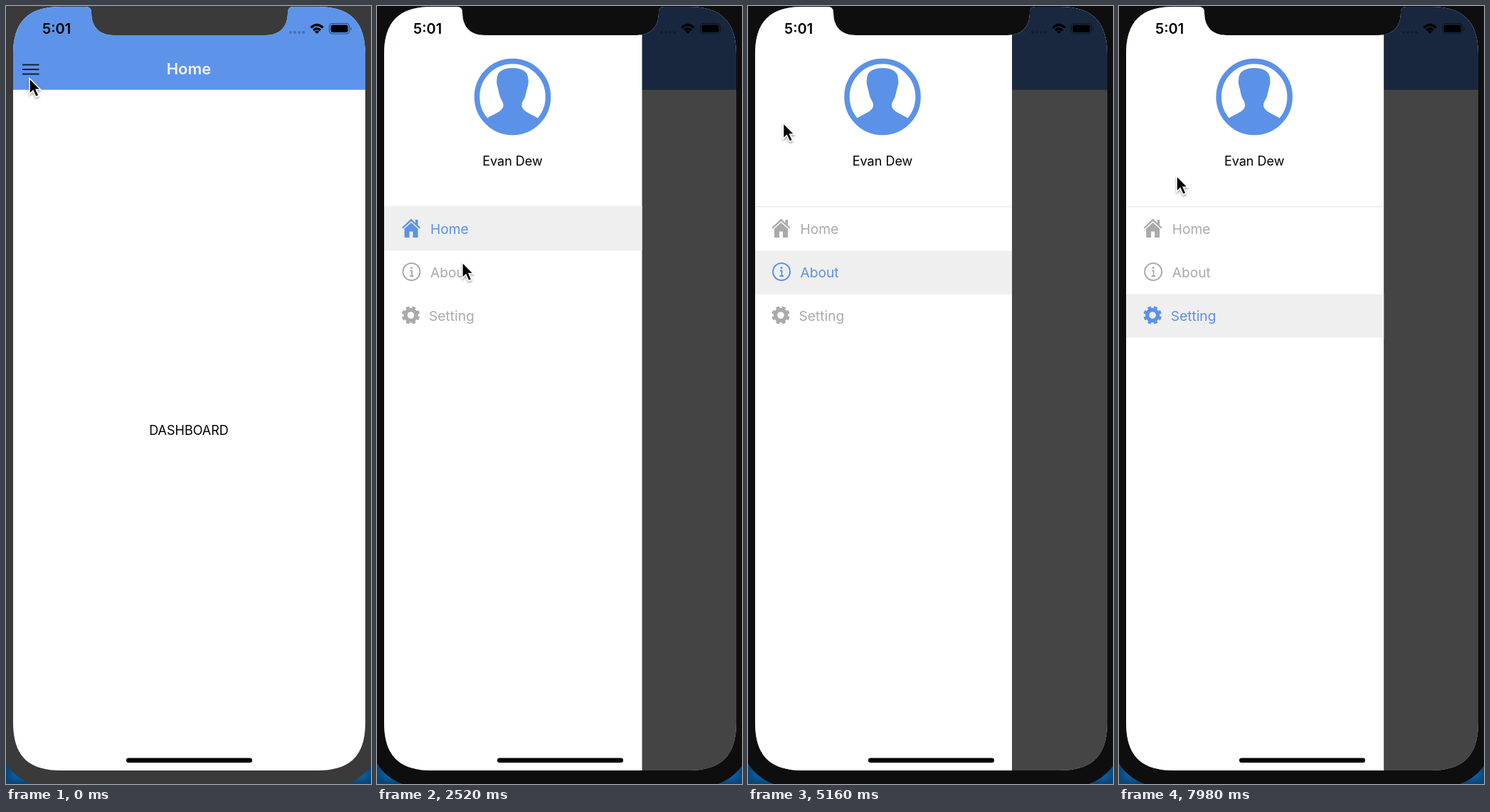
Recreate the animation shown at these times as an HTML page. Size 513 px wide and 1092 px high, loop 8 s.

```html
<!DOCTYPE html>
<html lang="en">
<head>
<meta charset="utf-8">
<title>Drawer menu</title>
<style>
  html, body { margin: 0; width: 100%; height: 100%; overflow: hidden; }
  svg { display: block; width: 513px; height: 1092px; font-family: Inter, Roboto, sans-serif; }
  .mid { text-anchor: middle; }
  .item { font-size: 19.2px; fill: #aaa; color: #aaa; }
  .item.on { fill: #5b92e8; color: #5b92e8; }
  .item .row { fill: none; }
  .item.on .row { fill: #efefef; }
  .line { fill: none; stroke: currentColor; }
</style>
</head>
<body>
<svg viewBox="0 0 513 1092">
  <defs>
    <clipPath id="screen">
      <path d="M10 68C10 22 31 1 77 1H112Q120 1 120 9C120 29 131 41 151 41H365C385 41 396 29 396 9Q396 1 404 1H438C484 1 505 22 505 68V1006C505 1052 484 1073 438 1073H77C31 1073 10 1052 10 1006Z"/>
    </clipPath>
    <clipPath id="disc"><circle cx="190.5" cy="127.5" r="50"/></clipPath>
    <radialGradient id="desk">
      <stop offset=".3" stop-color="#0a5fa3"/>
      <stop offset="1" stop-color="#0a4577"/>
    </radialGradient>
    <filter id="shadow" x="-50%" y="-50%" width="200%" height="200%">
      <feDropShadow dx="0" dy="2" stdDeviation="1.5" flood-opacity=".4"/>
    </filter>
  </defs>

  <rect id="bezel" width="513" height="1092"/>
  <path fill="url(#desk)" d="M0 1063Q12 1083 36 1092H0Z"/>
  <path fill="url(#desk)" d="M515 1063Q503 1083 479 1092H515Z"/>

  <g clip-path="url(#screen)">
    <rect width="513" height="1092" fill="#fff"/>
    <rect width="513" height="117.5" fill="#5d94ea"/>
    <path d="M10 117.5H505" stroke="#a9b9d2"/>
    <path d="M23 82.5H46.500M23 89H46.500M23 95.500H46.500" stroke="#14213a" stroke-width="2"/>
    <text id="title" class="mid" x="257" y="96" font-size="22" font-weight="600" fill="#f3f3f3"></text>
    <text id="body" class="mid" x="257" y="601.500" font-size="18"></text>
    <rect id="dim" width="513" height="1092"/>

    <g id="drawer">
      <rect x="10" width="362.500" height="1092" fill="#fff"/>
      <g fill="#5b92e8">
        <circle cx="190.500" cy="127.500" r="50" fill="none" stroke="#5b92e8" stroke-width="7.500"/>
        <path clip-path="url(#disc)" d="M190.500 87C177 87 168.500 92 168.500 103Q167.500 108 169.500 114C171 119 171 121 172 124C173 131 178 134 177.500 140C177 148 163 152 154 158V182H227V158C218 152 204 148 203.500 140C203 134 208 131 209 124C210 121 210 119 211.500 114Q213.500 108 212.500 103C212.500 92 204 87 190.500 87Z"/>
      </g>
      <text class="mid" x="190.500" y="223.500" font-size="18">Evan Dew</text>
      <path d="M10 281.500H372.500" stroke="#ececec" stroke-width="1.500"/>

      <g class="item">
        <rect class="row" x="10" y="281" width="362.500" height="62.500"/>
        <path d="M48 298.500L35 311L36.500 312.500L48 302L59.500 312.500L61 311L57.500 307.500V300H54V304.500ZM48 304L38.500 312.500V325H45.500V316.500H50.500V325H57.500V312.500Z"/>
        <text x="75" y="319.500">Home</text>
      </g>
      <g class="item">
        <rect class="row" x="10" y="343.500" width="362.500" height="61"/>
        <circle class="line" cx="48.500" cy="373" r="12" stroke-width="2"/>
        <circle cx="48.500" cy="367.500" r="1.500"/>
        <path class="line" d="M46.500 371.500H49V379M46 379H51.500" stroke-width="1.800"/>
        <text x="75" y="380.500">About</text>
      </g>
      <g class="item">
        <rect class="row" x="10" y="404.500" width="362.500" height="61"/>
        <g class="line" transform="translate(47.500 434) rotate(10)">
          <circle r="7.500" stroke-width="5.500"/>
          <circle r="11" pathLength="16" stroke-width="3.500" stroke-dasharray="1.100 .9"/>
        </g>
        <text x="73" y="441.500">Setting</text>
      </g>
    </g>

    <text x="51" y="39" font-size="20" font-weight="600">5:01</text>
    <path d="M400 37H418.100" stroke="#000" stroke-opacity=".25" stroke-width="4" stroke-linecap="round" stroke-dasharray="0 6"/>
    <g fill="none" stroke="#000" stroke-width="3.300">
      <path d="M428.500 30.500Q437 22.500 445.500 30.500M432 34Q437 29.500 442 34"/>
      <path d="M437 39L433.800 36Q437 33.500 440.200 36Z" fill="#000" stroke="none"/>
      <rect x="454.500" y="24.500" width="28" height="14.500" rx="4" stroke-width="1.200" stroke-opacity=".5"/>
      <path d="M484.500 29.500Q487 32 484.500 34.500Z" fill="#000" fill-opacity=".5" stroke="none"/>
      <rect x="456.500" y="26.500" width="24" height="10.500" rx="2.500" fill="#000" stroke="none"/>
    </g>
    <rect x="169" y="1055.500" width="177" height="6.500" rx="3.250"/>
  </g>

  <path id="cursor" filter="url(#shadow)" d="M1 .5V22.500L6 17.800L10 26.500L14 24.800L10.200 16.300H16.500Z" stroke="#fff" stroke-width="1.500"/>
</svg>
<script>
const LOOP = 8000, WIDTH = 362.5;
const $ = id => document.getElementById(id);
const items = document.querySelectorAll('.item');

const pages = [
  { from: 0, title: 'Home', body: 'DASHBOARD' },
  { from: 3060, title: 'About', body: 'ABOUT PAGE' },
  { from: 6050, title: 'Setting', body: 'SETTING PAGE' }
];
// [time, drawer open or closed]
const toggles = [[1088, 1], [3067, 0], [4682, 1], [6064, 0], [7400, 1]];
// [time, x, y]
const moves = [
  [0, 32, 101], [650, 32, 101], [950, 33, 92], [1650, 33, 92],
  [2650, 123, 372], [3400, 123, 372], [4350, 33, 84], [4900, 33, 84],
  [5750, 102, 438], [6300, 102, 438], [7140, 10, 97], [7320, 30, 92],
  [7600, 30, 92], [7980, 80, 238], [LOOP, 80, 238]
];

// Critically damped spring from 0 to 1
function spring(ms) {
  const x = Math.max(0, ms) * 0.016;
  return 1 - (1 + x) * Math.exp(-x);
}

function cursorAt(t) {
  const i = moves.findIndex(m => m[0] > t);
  const [t0, x0, y0] = moves[i - 1], [t1, x1, y1] = moves[i];
  const u = (t - t0) / (t1 - t0), e = u * u * (3 - 2 * u);
  return [x0 + (x1 - x0) * e, y0 + (y1 - y0) * e];
}

function draw(now) {
  const t = now % LOOP;
  const open = toggles.reduce((p, [at, goal]) => p + (goal - p) * spring(t - at), 0);
  const active = pages.findLastIndex(p => t >= p.from);

  $('bezel').setAttribute('fill', t < 940 ? '#3a3a3a' : '#0e0e0e');
  $('title').textContent = pages[active].title;
  $('body').textContent = pages[active].body;
  items.forEach((el, i) => el.classList.toggle('on', i === active));
  $('dim').setAttribute('opacity', 0.733 * open);
  $('drawer').setAttribute('transform', `translate(${(open - 1) * WIDTH} 0)`);
  $('cursor').setAttribute('transform', `translate(${cursorAt(t)})`);
  requestAnimationFrame(draw);
}
requestAnimationFrame(draw);
</script>
</body>
</html>
```
